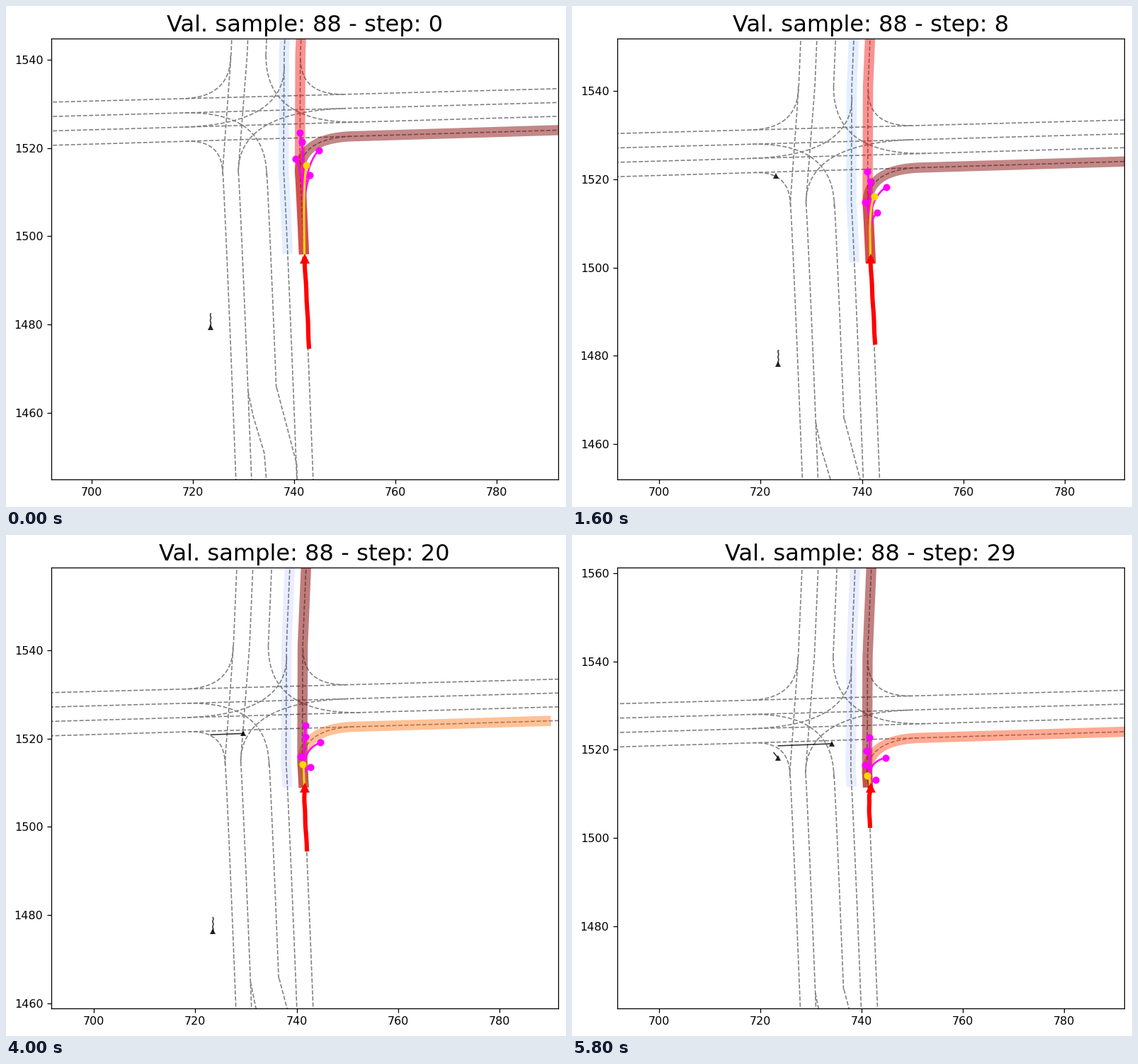
Write a matplotlib script that moves like this. It is 791x708 px and loops after 6000 ms.

```python
import numpy as np
import matplotlib.pyplot as plt
from matplotlib.animation import FuncAnimation
from matplotlib.ticker import MultipleLocator

W, H, DPI = 791, 708, 115.5
STEPS, PAST = 30, 20
SOUTH, NORTH = 1515, 1541      # edges of the crossing
NODE_GAP = 2.592

fig = plt.figure(figsize=((W + 1e-9) / DPI, (H + 1e-9) / DPI), dpi=DPI)
ax = fig.add_axes([63.7 / W, 39 / H, 715.8 / W, 623.2 / H])
jet = plt.get_cmap("jet")


def turn(a, corner, b):
    """Quadratic curve from a to b, pulled towards the corner."""
    t = np.linspace(0, 1, 24)[:, None]
    a, corner, b = map(np.array, (a, corner, b))
    return (1 - t) ** 2 * a + 2 * t * (1 - t) * corner + t ** 2 * b


def avenue(x, shift=0, lo=1440, hi=1570):
    """Lane along y: bends on both sides of the crossing, shifts inside it."""
    y = np.linspace(lo, hi, 60)
    below, above = np.maximum(SOUTH - y, 0), np.maximum(y - NORTH, 0)
    inside = np.clip((y - SOUTH) / (NORTH - SOUTH), 0, 1)
    return np.column_stack(
        [x + .057 * below ** .9 + shift * inside + .037 * above, y])


def street(row, x):
    """Point on one of the four lanes along x, row 0 at the top."""
    return x, 1530.42 - 3.265 * row + (.0305 + .0013 * row) * (x - 692)


def bend(x, y, row, x_end):
    """Turn from an avenue lane into a street lane."""
    return turn((x, y), street(row, x), street(row, x_end))


ahead_lane = avenue(741.12, .08)
left_lane = avenue(737.9, .1)
right_turn = bend(741.12, 1514.5, 3, 751.6)

lanes = [ahead_lane, left_lane, right_turn,
         avenue(725.88, 1.65), avenue(728.96, 1.75),
         avenue(734.41, lo=NORTH), avenue(734.55, lo=1465.6, hi=SOUTH)]
lanes += [np.array([street(row, 690), street(row, 795)]) for row in range(4)]
lanes += [
    np.array([(736.55, 1465.6), (740.5, 1448.3), (740.65, 1440)]),
    np.array([(730.9, 1464.8), (731.9, 1459.2), (734.1, 1450.8),
              (734.8, 1440)]),
    bend(727.45, 1541, 0, 718),
    bend(725.88, 1514, 3, 718.8),
    bend(734.55, 1513.7, 1, 718),
    bend(738.04, 1538.6, 2, 718),
    bend(728.96, 1514.5, 1, 750.2),
    bend(734.41, 1541, 2, 753),
    bend(741.26, 1540.2, 0, 750.2),
]


def car(t):
    """Drifts towards x = 741.5 and brakes smoothly around step 13."""
    t = np.asarray(t, float)
    d = (t - 17) ** 2
    x = 741.53 + .0021 * d / (1 + .0008 * d)
    y = 1505.69 + .2 * t - 4.05 * np.logaddexp(0, (13 - t) / 5)
    return x + .03 * np.sin(np.pi * t / 4), y


def walker(t):
    return 723.5 + .06 * np.sin(t * .8), 1479.4 - .153 * t


def crosser(t):
    return 723.05 + .53 * (t - 8), 1520.85 + .024 * (t - 8)


def latecomer(t):
    return 722.7 + .16 * (t - 24), 1519.3 - .22 * (t - 24)


# path, first step, last step
others = [(walker, -PAST, 27), (crosser, 8, STEPS), (latecomer, 24, STEPS)]

# Forecast goals stay near fixed places and scatter a little every step
modes = np.array([(741.4, 1522.5), (741.9, 1520), (740.4, 1516),
                  (744.5, 1518.5), (742.6, 1513)])
scatter = np.random.default_rng(88).normal(0, .35, (STEPS,) + modes.shape)


def trim(path, y0):
    x0 = np.interp(y0, path[:, 1], path[:, 0])
    return np.vstack([(x0, y0), path[path[:, 1] > y0]])


def first_node(y, base):
    """Routes start at the first lane node ahead of the car."""
    return base + NODE_GAP * np.ceil((y - base - 1.13) / NODE_GAP)


def draw_routes(i, y):
    swing = np.exp(-((i - 24) / 6.5) ** 2)
    p_turn, p_ahead = .47 - .09 * swing, .425 + .125 * swing
    top = max(p_turn, p_ahead)
    end = street(3, 783.3 + 1.72 * abs(i - 16))

    ahead = trim(ahead_lane, first_node(y, 1495.9))
    side = np.vstack([ahead[ahead[:, 1] < 1514.5], right_turn, end])
    left = trim(left_lane, first_node(y, 1496))
    for p, path in ((1 - p_turn - p_ahead, left), (p_turn, side),
                    (p_ahead, ahead)):
        ax.plot(*path.T, color=jet(float(p / top)), alpha=p, lw=9,
                solid_capstyle="butt", zorder=2)
    if end[0] + 5.1 < ax.get_xlim()[1]:
        ax.text(end[0] + .05, end[1] + .55, f"{p_turn:.2f}",
                color=jet(float(p_turn / top)), zorder=3)


def draw_forecast(x, y, goal, color, lw, z):
    """Straight for a while, then a bend to the goal."""
    reach = goal[1] - y
    curve = turn((x - .1, y + .45 * reach), (x - .1, y + .85 * reach), goal)
    path = np.vstack([(x, y), curve])
    ax.plot(*path.T, color=color, lw=lw, zorder=z)
    ax.plot(*goal, "o", color=color, ms=6.3, mew=0, zorder=z)


def frame(i):
    ax.clear()
    x, y = car(i)
    ax.set_xlim(x - 50, x + 50)
    ax.set_ylim(y - 50, y + 50)
    for axis in (ax.xaxis, ax.yaxis):
        axis.set_major_locator(MultipleLocator(20))
    ax.set_title(f"Val. sample: 88 - step: {i}", fontsize=20)

    for path in lanes:
        ax.plot(*path.T, "--", color="#7f7f7f", lw=1, zorder=1)
    draw_routes(i, y)

    for pos, first, last in others:
        if first <= i <= last:
            t = np.arange(max(first, i - PAST), i + 1)
            ax.plot(*pos(t), color="black", lw=1, alpha=.8, zorder=4)
            ax.plot(*pos(i), "^", color="black", ms=5, mew=0, alpha=.85,
                    zorder=4)

    sway = np.array([0, 1.2 * np.cos(2 * np.pi * i / 24)])
    for goal in modes + scatter[i] + sway:
        draw_forecast(x, y, goal, "magenta", 1.6, 5)
    truth = (742.4, 1516.1) if i < 10 else (741.2, 1514.1)
    draw_forecast(x, y, truth, "gold", 2, 6)

    ax.plot(*car(np.arange(i - PAST, i + 1)), color="red", lw=3.8, zorder=7)
    ax.plot(x, y, "^", color="red", ms=8.2, mew=0, zorder=7)
    return []


anim = FuncAnimation(fig, frame, frames=STEPS, interval=200,
                     init_func=lambda: frame(0), repeat=True, repeat_delay=0)
plt.show()
```
